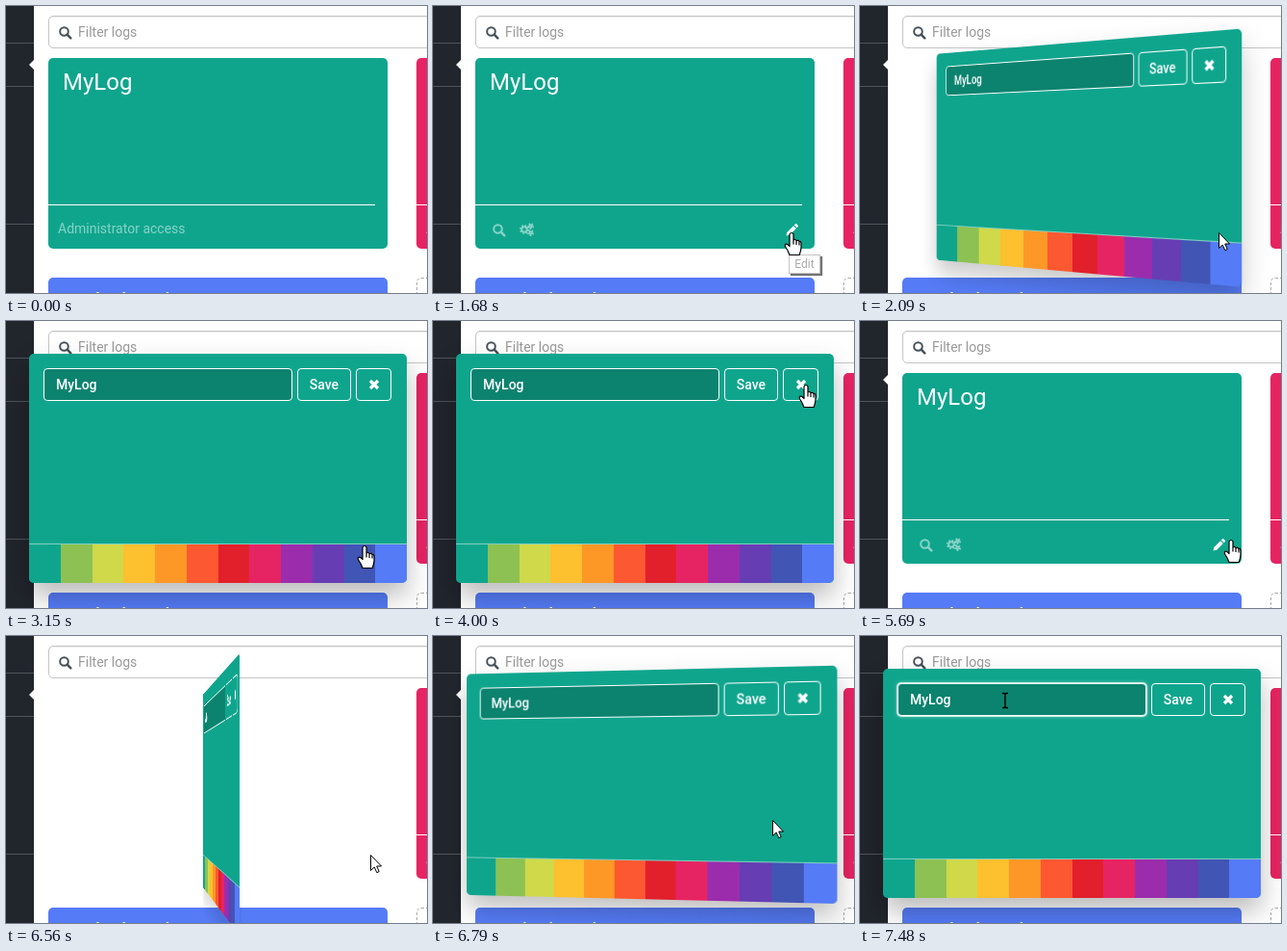
Recreate the animation shown at these times as an HTML page. Size 438x298 px, loop 8000 ms.

```html
<!DOCTYPE html>
<html lang="en">
<head>
<meta charset="utf-8">
<title>Card flip</title>
<style>
  html, body { margin: 0; width: 100%; height: 100%; overflow: hidden; background: #fff; }
  * { box-sizing: border-box; }
  #stage { position: relative; width: 438px; height: 298px; overflow: hidden; background: #fff;
    font: 14px/20px Roboto, Arial, sans-serif; color: #fff; }
  #stage div, #stage svg { position: absolute; overflow: visible; }
  #stage .clip { overflow: hidden; }

  .side { left: 0; top: 0; width: 29px; height: 298px; background: #21252c; }
  .side i { position: absolute; left: 0; width: 29px; height: 1px; background: #4d5659; }
  .side b { position: absolute; left: 24px; top: 56px; border: 5px solid transparent;
    border-left: 0; border-right-color: #fff; }
  .search { left: 44px; top: 10px; width: 420px; height: 34px; border: 1px solid #c6c6c6;
    border-radius: 5px; color: #999; padding: 6px 30px; box-shadow: inset 0 1px 1px rgba(0,0,0,.08); }

  .card { width: 353px; height: 198px; border-radius: 5px; }
  .title { left: 15px; top: 10px; font-size: 24px; line-height: 30px; white-space: nowrap; }
  .rule { left: 0; top: 152px; width: 340px; height: 1px; background: #fff; }
  .access { left: 10px; top: 167px; opacity: .5; white-space: nowrap; }
  .green { background: #0fa58d; }
  .pink { left: 427px; top: 54px; background: #e72463; }
  .blue { left: 44px; top: 282px; background: #557bf6; }
  .empty { left: 427px; top: 282px; border: 1px dashed #aaa; }

  #scene { left: 44px; top: 54px; width: 353px; height: 198px; perspective: 1050px; }
  #flip { width: 100%; height: 100%; transform-style: preserve-3d; }
  #front, #back { backface-visibility: hidden; }
  #back { left: -20px; top: 0; width: 393px; height: 238px; border-radius: 5px;
    transform: rotateY(180deg); font-weight: 500; }
  .box { top: 15px; height: 34px; border: 1px solid #fff; border-radius: 4px;
    line-height: 32px; text-align: center; }
  #input { left: 15px; width: 259px; padding-left: 12px; text-align: left; background: #0c836f; }
  #input.focus { box-shadow: 0 0 0 1px rgba(255,255,255,.75), 0 0 4px rgba(255,255,255,.6); }
  #swatches { left: 0; top: 197px; width: 393px; height: 41px; display: flex;
    border-top: 1px solid #7fcfc1; border-radius: 0 0 5px 5px; }
  #swatches i { flex: 1; }
  #tip { left: 370px; top: 258px; width: 33px; height: 20px; border: 1px solid #c4c4c4;
    background: #fff; color: #aaa; font-size: 12px; line-height: 18px; text-align: center;
    box-shadow: 2px 2px 1px rgba(0,0,0,.55); }
</style>
</head>
<body>
<div id="stage">
  <div class="side"><i style="top:38px"></i><i style="top:83px"></i><i style="top:226px"></i><b></b></div>
  <div class="search">Filter logs
    <svg style="left:10px;top:10px" width="14" height="14" fill="none" stroke="#47525a" stroke-width="2"><use href="#lens"/></svg>
  </div>
  <div class="card pink"><div class="rule"></div><div class="access">Administrator access</div></div>
  <div class="card blue"><div class="title">Web detail</div></div>
  <div class="card empty"></div>

  <div id="scene"><div id="flip">
    <div id="front" class="card green">
      <div class="title">MyLog</div>
      <div class="rule"></div>
      <div id="access" class="access">Administrator access</div>
      <svg id="icons" width="353" height="198" fill="none" stroke="#fff">
        <defs><g id="lens"><circle cx="5.5" cy="5.5" r="4.3"/><path d="M8.7 8.7L12.3 12.3" stroke-width="2.6" stroke-linecap="round"/></g></defs>
        <g opacity=".5">
          <g transform="translate(18 172)" stroke-width="2"><use href="#lens"/></g>
          <g id="gears"></g>
        </g>
        <path id="pencil" fill="#fff" stroke="none" d="M323.5 184.5L324.3 181L331 174.3L333.8 177.1L327.1 183.8ZM331.8 173.5L333 172.3Q333.7 171.8 334.4 172.4L335.7 173.7Q336.3 174.4 335.8 175.1L334.6 176.3Z"/>
      </svg>
    </div>
    <div id="back" class="green">
      <div id="input" class="box">MyLog</div>
      <div class="box" style="left:279px;width:56px">Save</div>
      <div class="box" style="left:340px;width:37px">
        <svg style="left:13px;top:11px" width="10" height="10" stroke="#fff" stroke-width="3.2"><path d="M1 1L9 9M9 1L1 9"/></svg>
      </div>
      <div id="swatches" class="clip"></div>
    </div>
  </div></div>

  <div id="tip">Edit</div>
  <svg id="cursor" width="1" height="1" stroke="#000" fill="#fff" stroke-linejoin="round">
    <path id="arrow" d="M.5 .5V16.5L4.2 13L6.8 18.7L9.2 17.6L6.7 12H11.5Z"/>
    <path id="hand" stroke-width="1.2" d="M-2 2Q0 -1 2 2V8Q4 6.6 5 8.8Q7 7.5 8 9.7Q10 8.8 10 11.5V16Q9.8 19 8.2 23.5H-2Q-3.5 19 -6.7 14.5Q-7 11 -4 12.6L-2 14.5ZM2 8V12.5M5 9V13M8 10V13.5"/>
    <path id="beam" fill="none" stroke-width="1.5" d="M-3 -7.5H-1L0 -6.5L1 -7.5H3M0 -6.5V6.5M-3 7.5H-1L0 6.5L1 7.5H3"/>
  </svg>
</div>
<script>
const $ = id => document.getElementById(id);
const LOOP = 8000;

// Bursts of screen updates: first, last, count.
const BURSTS = [[610, 990, 6], [1150, 1150, 1], [1680, 1680, 1], [1780, 2390, 9],
  [3150, 3920, 11], [4000, 4000, 1], [4460, 5170, 10], [5400, 5690, 5],
  [5910, 5990, 2], [6410, 7170, 11], [7250, 7480, 4]];

// Card turns: start time; each one swaps the side.
const TURNS = [1790, 4504, 6377];
const TURN_MS = 600;

// Pointer path: time, x, y, shape kept until the next point.
const PATH = [[0, 362, 310, 'arrow'], [600, 362, 300, 'arrow'], [840, 366, 246, 'arrow'],
  [980, 370, 236, 'hand'], [1120, 370, 236, 'hand'], [1145, 374, 236, 'hand'],
  [1770, 373, 235, 'arrow'], [2230, 373, 235, 'hand'], [3140, 373, 235, 'hand'],
  [3220, 376, 222, 'arrow'], [3680, 393, 85, 'hand'], [3830, 396, 61, 'hand'],
  [3910, 390, 67, 'hand'], [3990, 388, 66, 'hand'], [4450, 387, 66, 'arrow'],
  [5380, 387, 66, 'arrow'], [5610, 375, 222, 'hand'], [5690, 386, 227, 'hand'],
  [5890, 386, 227, 'hand'], [5990, 379, 227, 'hand'], [6400, 379, 227, 'arrow'],
  [6700, 379, 227, 'arrow'], [7080, 270, 76, 'beam'], [7170, 215, 69, 'beam'],
  [7400, 151, 67, 'beam'], [8000, 151, 67, 'beam']];

const COLORS = ['#0fa58d', '#8dc153', '#cfd94a', '#fdc02f', '#fd9827', '#fc5831',
  '#e1202c', '#e72463', '#9b2dac', '#673db3', '#4155b4', '#557bf6'];
$('swatches').innerHTML = COLORS.map(c => `<i style="background:${c}"></i>`).join('');

// A toothed wheel: solid ring plus a dashed rim.
const gear = (x, y, r, teeth) => {
  const rim = r + 1.3, step = Math.PI * rim / teeth;
  return `<circle cx="${x}" cy="${y}" r="${r}" stroke-width="2"/>` +
    `<circle cx="${x}" cy="${y}" r="${rim}" stroke-width="1.8" stroke-dasharray="${step}"/>`;
};
$('gears').innerHTML = gear(51, 178, 2.8, 8) + gear(57.6, 174.6, 1.3, 5) + gear(57.6, 181.6, 1.3, 5);

function lastUpdate(t) {
  let shown = 0;
  for (const [from, to, n] of BURSTS) {
    if (t < from) break;
    const step = n > 1 ? (to - from) / (n - 1) : 1;
    shown = from + step * Math.min(n - 1, Math.floor((t - from) / step + .1));
  }
  return shown;
}

// The standard "ease" curve, cubic-bezier(.25, .1, .25, 1).
function ease(x) {
  if (x <= 0) return 0;
  if (x >= 1) return 1;
  let lo = 0, hi = 1, s = .5;
  for (let i = 0; i < 24; i++) {
    s = (lo + hi) / 2;
    if (.75 * s * (1 - s) + s ** 3 < x) lo = s; else hi = s;
  }
  return .3 * s * (1 - s) ** 2 + 3 * s * s * (1 - s) + s ** 3;
}

const turned = t => TURNS.reduce((sum, start, i) =>
  sum + (i % 2 ? -1 : 1) * ease((t - start) / TURN_MS), 0);

function pointer(t) {
  let i = 0;
  while (i < PATH.length - 2 && PATH[i + 1][0] <= t) i++;
  const [t0, x0, y0, kind] = PATH[i], [t1, x1, y1] = PATH[i + 1];
  const k = Math.min(1, (t - t0) / (t1 - t0));
  return { x: Math.round(x0 + (x1 - x0) * k), y: Math.round(y0 + (y1 - y0) * k), kind };
}

const show = (id, on) => { $(id).style.display = on ? '' : 'none'; };

function draw(time) {
  const t = lastUpdate(time), e = turned(t), p = pointer(t);
  $('flip').style.transform = `translateY(${-20 * e}px) rotateY(${180 * e}deg)`;
  const shadow = `0 14px 28px rgba(0,0,0,${.27 * e})`;
  $('front').style.boxShadow = $('back').style.boxShadow = shadow;
  show('front', e < .5);
  show('back', e >= .5);

  const over = p.x > 44 && p.x < 397 && p.y > 54 && p.y < 252;
  show('access', !over);
  show('icons', over);
  $('pencil').style.opacity = p.kind === 'hand' && e < .01 ? 1 : .55;
  $('input').classList.toggle('focus', t >= 7470);
  show('tip', t >= 1680 && t < 1780);

  $('cursor').style.transform = `translate(${p.x}px, ${p.y}px)`;
  for (const kind of ['arrow', 'hand', 'beam']) show(kind, kind === p.kind);
}

const begin = performance.now();
function tick() {
  draw((performance.now() - begin) % LOOP);
  requestAnimationFrame(tick);
}
tick();
</script>
</body>
</html>
```
